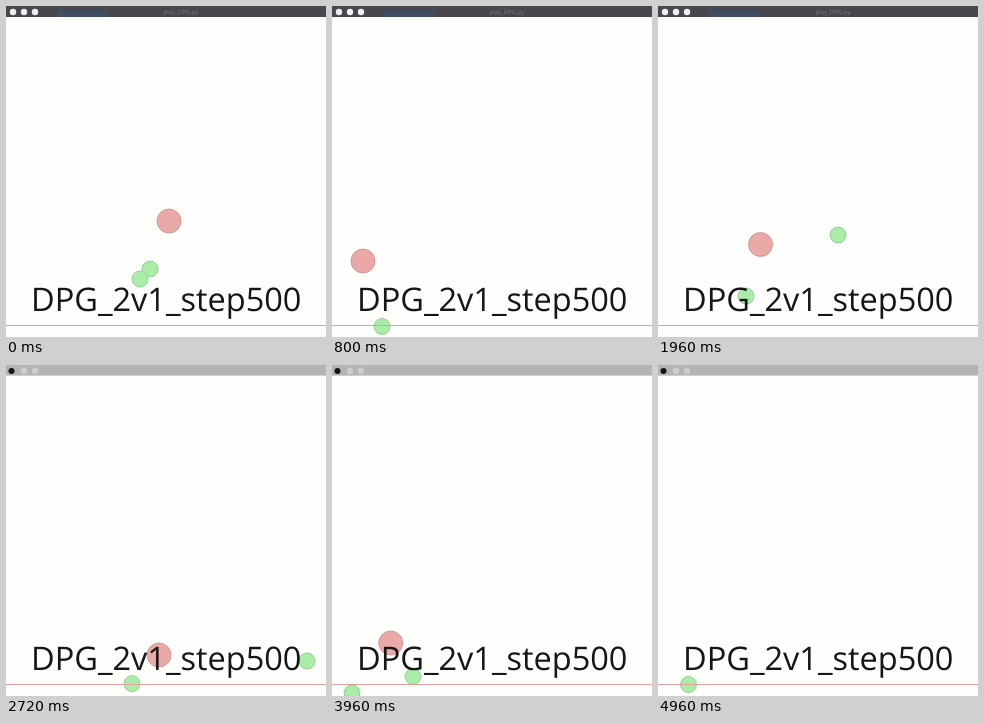
Write an HTML page that moves like this. It is 320 px wide and 331 px high and loops after 5000 ms.

```html
<!DOCTYPE html>
<html lang="en">
<head>
<meta charset="utf-8">
<title>DPG_2v1_step500</title>
<style>
  html, body { margin: 0; width: 100%; height: 100%; overflow: hidden; background: #fefefc; }
  svg { display: block; width: 100%; height: 100%; }
  text { text-rendering: geometricPrecision; }
  .caption { font: 32.5px "Open Sans", "Noto Sans", sans-serif; fill: #161616; }
  .title { font: 6px "Open Sans", "Noto Sans", sans-serif; fill: #7b7980; text-anchor: middle; }
  .runner { fill: #eaa9a7; stroke: #c48f8e; }
  .chaser { fill: #a9eda9; stroke: #8ac78c; }
  .runner, .chaser { stroke-width: .8; }
</style>
</head>
<body>
<svg viewBox="0 0 320 331" preserveAspectRatio="none">
  <rect width="320" height="331" fill="#fefefc"/>
  <g id="darkBar">
    <rect width="320" height="11" fill="#49474e"/>
    <rect x="52" y="4" width="50" height="7" fill="#414d60"/>
    <g fill="#efeff0">
      <circle cx="7" cy="6" r="3.2"/><circle cx="18" cy="6" r="3.2"/><circle cx="29" cy="6" r="3.2"/>
    </g>
    <text class="title" x="175" y="7.5">play_DPG.py</text>
  </g>
  <g id="lightBar">
    <rect width="320" height="10.6" fill="#b4b4b4"/>
    <circle cx="5.5" cy="6" r="3" fill="#151515"/>
    <g fill="#cecece">
      <circle cx="18" cy="6" r="3.2"/><circle cx="29" cy="6" r="3.2"/>
    </g>
  </g>
  <g id="balls"></g>
  <path d="M0 319.5H320" stroke="#e59c9c"/>
  <text class="caption" x="25" y="305.2">DPG_2v1_step500</text>
</svg>
<script>
const LOOP = 5000, STEP = 40, BAR_SWITCH = 2160;
const SWAY = 0.06; // sideways px per ms of a leg
const $ = id => document.getElementById(id);

// Key poses; negative x lies outside the stage.
const poses = [
  { at: 0,    runner: [163, 215],   lead: [144, 263],   tail: [134, 273] },
  { at: 800,  runner: [31, 255],    lead: [50, 320.5],  tail: [20, 342] },
  { at: 1960, runner: [102.5, 238.5], lead: [180, 229], tail: [88, 290] },
  { at: 2720, runner: [153, 290],   lead: [301, 296],   tail: [126, 318.6] },
  { at: 3320, runner: [-14, 290],   lead: [16.7, 314],  tail: [-10, 325] },
  { at: 3960, runner: [58.7, 278],  lead: [81, 311.5],  tail: [20, 328] },
  { at: 4960, runner: [-14, 285],   lead: [30.5, 319.5], tail: [-10, 320] }
];
const pauses = [[1680, 1760], [4040, 4160]];

const balls = ["lead", "tail", "runner"].map((name, index) => {
  const kind = name === "runner" ? "runner" : "chaser";
  const node = document.createElementNS("http://www.w3.org/2000/svg", "circle");
  node.setAttribute("class", kind);
  node.setAttribute("r", kind === "runner" ? 12 : 8);
  $("balls").append(node);
  return { name, index, node };
});

function positionAt({ name, index }, time) {
  const leg = Math.max(0, poses.findLastIndex((pose, i) => i < poses.length - 1 && pose.at <= time));
  const from = poses[leg], to = poses[leg + 1];
  const span = to.at - from.at, k = (time - from.at) / span;
  const sway = SWAY * span * Math.sin(leg * 2.4 + index) * Math.sin(Math.PI * k);
  const [x, y] = from[name].map((value, axis) => value + (to[name][axis] - value) * k);
  return [x + sway, y];
}

function draw(now) {
  let time = Math.floor(now % LOOP / STEP) * STEP;
  const dark = time < BAR_SWITCH;
  for (const [start, end] of pauses) {
    if (time >= start && time <= end) time = start;
  }
  for (const ball of balls) {
    const [x, y] = positionAt(ball, time);
    ball.node.setAttribute("cx", x);
    ball.node.setAttribute("cy", y);
  }
  $("darkBar").style.display = dark ? "" : "none";
  $("lightBar").style.display = dark ? "none" : "";
}

const start = performance.now();
function frame() {
  draw(performance.now() - start);
  requestAnimationFrame(frame);
}
frame();
</script>
</body>
</html>
```
